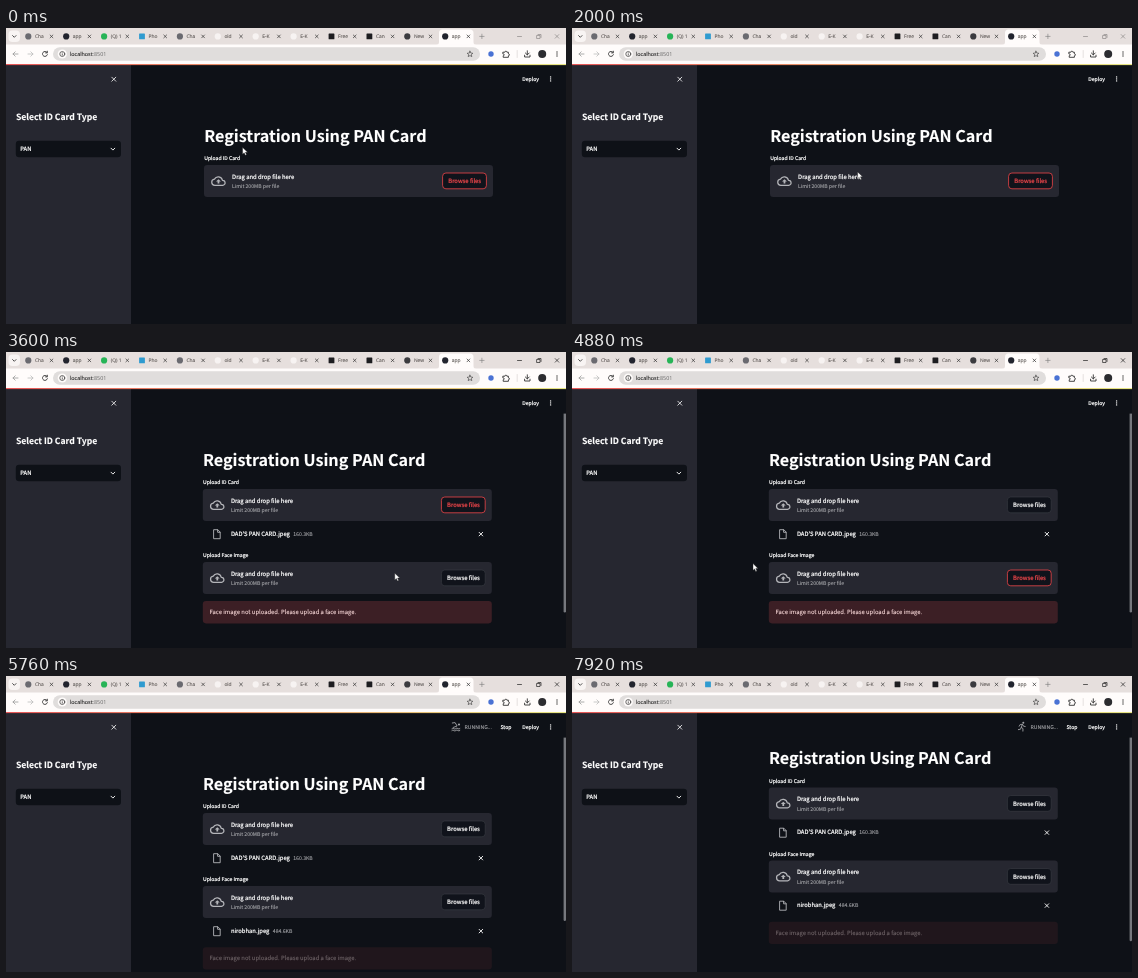
Animation, 560 px wide and 296 px high, one loop 8 s. Source, as an HTML page:

```html
<!DOCTYPE html>
<html lang="en">
<head>
<meta charset="utf-8">
<title>Registration form</title>
<style>
  html, body { margin: 0; width: 100%; height: 100%; overflow: hidden; background: #0e1117; }
  svg { display: block; width: 560px; height: 296px; }
  text {
    font-family: "Noto Sans CJK SC", "Noto Sans CJK JP", "Noto Sans CJK", Lato, sans-serif;
    font-size: 5.87px; text-rendering: geometricPrecision; white-space: pre;
    color: #fff; fill: currentColor; stroke: currentColor; stroke-width: .22;
  }
  .small { font-size: 5.14px; }
  .muted { color: #a3a4a8; stroke-width: .12; }
  .title { font-size: 16.15px; font-weight: 700; }
  .heading { font-size: 8.6px; font-weight: 700; }
  .title, .heading { stroke-width: .15; }
  .chrome { font: 5.4px "Open Sans", sans-serif; color: #222; stroke-width: .1; }
  .tab { font-size: 4.9px; color: #5c5755; }
  .alert { color: #ffdede; stroke-width: .1; }
  .line { fill: none; stroke-linecap: round; stroke-linejoin: round; }
  .button rect { fill: #10131b; stroke: #3c3e46; stroke-width: .6; }
  .button.active rect { stroke: #ee464a; stroke-width: .8; }
  .button.active text { color: #ee464a; }
</style>
</head>
<body>
<svg id="stage" viewBox="0 0 560 296" xmlns="http://www.w3.org/2000/svg"></svg>
<script>
const LOOP = 8000;
const ROW = 73;           // height of one uploader with its file row
const stage = document.getElementById('stage');

const text = (x, y, s, cls = '', extra = '') => `<text x="${x}" y="${y}" class="${cls}" ${extra}>${s}</text>`;
const rect = (x, y, w, h, fill, r = 0) => `<rect x="${x}" y="${y}" width="${w}" height="${h}" rx="${r}" fill="${fill}"/>`;
const dot = (x, y, r, fill) => `<circle cx="${x}" cy="${y}" r="${r}" fill="${fill}"/>`;
const line = (d, color, width = .8) => `<path class="line" d="${d}" stroke="${color}" stroke-width="${width}"/>`;
const cross = (x, y, r, color, width) =>
  line(`M${x - r} ${y - r}l${2 * r} ${2 * r}m0 ${-2 * r}l${-2 * r} ${2 * r}`, color, width);
const menuDots = (x, y, color, gap) => [-gap, 0, gap].map(d => dot(x, y + d, .7, color)).join('');

function tabStrip() {
  const pale = '#f7f3f2';
  const tabs = [
    ['Cha', '#6a6a70'], ['app', '#22242e'], ['(Q) 1', '#27b457'], ['Pho', '#2f9bd0', 1],
    ['Cha', '#6a6a70'], ['old', pale], ['E-K', pale], ['E-K', pale],
    ['Free', '#1d1d20', 1], ['Can', '#1d1d20', 1], ['New', '#3b3b3f'], ['app', '#22242e'],
  ];
  const items = tabs.map(([label, color, square], i) => {
    const x = 22.3 + i * 37.9;
    const icon = square ? rect(x - 2.9, 5.5, 5.8, 5.8, color, .6) : dot(x, 8.4, 3.1, color);
    return icon + text(x + 6.6, 10.2, label, 'chrome tab') + cross(x + 23.2, 8.4, 1.4, '#333', .7);
  });
  return rect(0, 0, 560, 17, '#e6dfdd') + rect(2.5, 2.5, 11.5, 11.5, '#f8f4f3', 4) +
    line('M6.6 7.6l1.7 1.7l1.7-1.7', '#222') +
    `<path d="M430 17q3 0 3-3V5q0-3.500 3.500-3.500h27.500q3.500 0 3.500 3.500v9q0 3 3 3z" fill="#fffcfb"/>` +
    items.join('') +
    line('M473.700 8.400h4.400m-2.200-2.200v4.400', '#777', .6) +
    '<g id="windowControls">' +
    line('M511.500 8.500h4M531 7.500h3v3h-3zM532 6.500h3v3', '#222', .7) + cross(551, 8.4, 1.8, '#222', .7) + '</g>';
}

function toolbar() {
  const dark = '#333';
  return rect(0, 16.5, 560, 20, '#fffcfb') +
    line('M12 26h-5m2.200-2.200l-2.200 2.200l2.200 2.200', '#999') +
    line('M22 26h5m-2.200-2.200l2.200 2.200l-2.200 2.200', '#bbb') +
    line('M40.900 24.300a2.500 2.500 0 1 0 .5 2.400M41.300 23.200v1.700h-1.700', dark, .9) +
    rect(47, 19.2, 427, 13.6, '#e0dddc', 6.8) + dot(56.3, 26, 4.6, '#fffcfb') +
    `<circle cx="56.300" cy="26" r="2.500" class="line" stroke="${dark}" stroke-width=".7"/>` +
    line('M56.300 26v1.200M56.300 24.800v.1', dark, .7) +
    text(64, 28, 'localhost<tspan fill="#666" stroke="none">:8501</tspan>', 'chrome') +
    line('M464 23.200l.85 1.850l2 .2l-1.500 1.350l.45 2l-1.800-1.050l-1.800 1.050l.45-2l-1.500-1.350l2-.2z', dark, .6) +
    dot(485, 26, 2.7, '#4a72d4') +
    line('M497.200 24.200h1.700a1 1 0 0 1 2 0h1.500v1.600a1 1 0 0 1 0 2v1.500h-5.200v-1.500a1 1 0 0 0 0-2z', dark, .9) +
    line('M511.200 22.500v7', '#cbc4c2', .5) +
    line('M521.300 22.800v4m-1.900-1.800l1.900 1.900l1.900-1.900M518.600 27.200v1.800h5.400v-1.800', dark, .9) +
    dot(536.2, 26, 4, '#2c2c30') + menuDots(551, 26, dark, 2) +
    rect(0, 36.2, 560, .9, 'url(#decoration)');
}

function sidebar() {
  return rect(0, 37, 125, 259, '#262730') + cross(107.8, 51.2, 2, '#fff', .8) +
    text(9.9, 91.9, 'Select ID Card Type', 'heading') +
    rect(9.8, 112.8, 105.2, 16.4, '#0e1117', 3.2) + text(14.2, 123.3, 'PAN') +
    line('M105 120.200l1.900 1.900l1.900-1.900', '#fff', .9);
}

function uploader(label, id) {
  return text(198.2, 132, label, 'small') + rect(198, 137, 289, 32, '#262730', 3.3) +
    `<g transform="translate(205.100 145.600) scale(.615)">
      ${line('M19 19H6a5 5 0 0 1-.5-9.970A7 7 0 0 1 18.500 11A4 4 0 0 1 19 19z', '#b4b5b9', 2)}
      <path d="M8 13h2.550v3h2.900v-3H16l-4-4z" fill="#b4b5b9"/></g>` +
    text(226.1, 150.6, 'Drag and drop file here') + text(226.1, 160.4, 'Limit 200MB per file', 'small muted') +
    `<g class="button" id="${id}"><rect x="436.600" y="145" width="43.800" height="15.800" rx="3.300"/>` +
    text(458.7, 155, 'Browse files', '', 'text-anchor="middle"') + '</g>';
}

const fileRow = (name, sizeX, size) =>
  line('M209.200 177.700h3.800l2.400 2.400v6.600h-6.200zM212.800 177.900v2.400h2.400', '#b4b5b9', .9) +
  text(226.1, 183.9, name) + text(sizeX, 183.6, size, 'small muted') + cross(476.1, 182.1, 1.8, '#fff', .9);

const errorBox = () => rect(198, 249, 289, 22.4, '#3c1f25', 3.3) +
  text(204.7, 262.3, 'Face image not uploaded. Please upload a face image.', 'alert');

function header() {
  const grey = '#a3a4a8';
  const swimmer = dot(453, 48.5, 1.1, grey) +
    line('M446.300 47l2.800-.4l2 3.400l-3.700 1.400M445.900 52.600q1-1 2 0t2 0t2 0t2 0M445.900 54.500q1-1 2 0t2 0t2 0t2 0', grey, .9);
  const runner = dot(451.3, 46.8, 1, grey) +
    line('M447.200 50.200l1-1.700l2.300-.2l1 1.900l1.700.3M450.300 48.500l-1 2.800l1.700 1.300l-.1 2.500M449.300 51.300l-.8 1.900l-2.100.4', grey, .9);
  return rect(125, 37, 435, 24.6, '#0e1117') +
    text(516.2, 52.9, 'Deploy', 'small') + menuDots(544.6, 50.9, '#fff', 2) +
    `<g id="running"><g id="swimmer">${swimmer}</g><g id="runner">${runner}</g>` +
    text(458.6, 52.9, 'RUNNING...', 'small muted') + text(494.4, 52.9, 'Stop', 'small') + '</g>';
}

stage.innerHTML =
  `<linearGradient id="decoration" gradientUnits="userSpaceOnUse" x1="0" x2="560">
    <stop stop-color="#ff4b4b"/><stop offset="1" stop-color="#fffd80"/></linearGradient>` +
  rect(0, 0, 560, 296, '#0e1117') +
  `<g id="content">
    ${text(198.2, 113.9, 'Registration Using PAN Card', 'title')}
    ${uploader('Upload ID Card', 'cardButton')}
    <g id="cardFile">${fileRow("DAD'S PAN CARD.jpeg", 288.4, '160.3KB')}</g>
    <g id="face" transform="translate(0 ${ROW})">${uploader('Upload Face Image', 'faceButton')}
      <g id="faceFile">${fileRow('nirobhan.jpeg', 268, '484.6KB')}</g></g>
    <g id="error">${errorBox()}</g>
  </g>
  <rect id="thumb" x="557.600" width="2.400" rx="1.200" fill="#76787d"/>` +
  header() + sidebar() + tabStrip() + toolbar() +
  `<path id="cursor" d="M0 0v6.800l1.600-1.400l1.100 2.500l1.200-.5l-1.100-2.500h2.200z" fill="#fff" stroke="#222" stroke-width=".4"/>`;

const part = Object.fromEntries([...stage.querySelectorAll('[id]')].map(el => [el.id, el]));
const show = (name, on) => part[name].setAttribute('visibility', on ? 'inherit' : 'hidden');
const move = (name, x, y) => part[name].setAttribute('transform', `translate(${x} ${y})`);
const fade = (name, opacity) => part[name].setAttribute('opacity', opacity);
const ramp = (t, from, to) => {
  const p = Math.min(1, Math.max(0, (t - from) / (to - from)));
  return p * p * (3 - 2 * p);
};

// time, x, y
const cursorPath = [
  [0, 236.6, 119.4], [160, 236.6, 119.4], [1040, 318.9, 135.3], [1500, 318.9, 135.3], [2400, 262, 150],
  [2660, 255, 152], [2920, 185.5, 210], [3240, 185.5, 210], [3780, 459, 225],
  [4080, 459, 225], [4700, 181, 211.5], [LOOP, 181, 211.5],
];
function cursorAt(t) {
  const i = cursorPath.findIndex(k => k[0] > t);
  const [t0, x0, y0] = cursorPath[i - 1], [t1, x1, y1] = cursorPath[i];
  const p = ramp(t, t0, t1);
  return [x0 + (x1 - x0) * p, y0 + (y1 - y0) * p];
}

function draw(t) {
  const hasCard = t >= 3200, hasFace = t >= 3360, hasPhoto = t >= 5200, running = t >= 5360;
  const scroll = 25.5 * ramp(t, 5840, 6160);

  fade('windowControls', t < 3120 ? .45 : 1);
  move('content', hasFace ? -1.2 : 0, -scroll);
  show('cardFile', hasCard);
  show('face', hasFace);
  show('faceFile', hasPhoto);
  show('error', hasFace);
  move('error', 0, hasPhoto ? 22.2 : 0);
  fade('error', 1 - .6 * ramp(t, 5360, 5600));

  part.cardButton.classList.toggle('active', t < 3700);
  part.faceButton.classList.toggle('active', t >= 3700 && !hasPhoto);

  show('thumb', hasFace);
  part.thumb.setAttribute('y', 37.4 + scroll * .8);
  part.thumb.setAttribute('height', hasPhoto ? 207.5 : 223);

  show('running', running);
  show('swimmer', running && t < 7040);
  show('runner', running && t >= 7040);

  show('cursor', t < 5120);
  move('cursor', ...cursorAt(t));
}

const start = performance.now();
function tick() {
  draw((performance.now() - start) % LOOP);
  requestAnimationFrame(tick);
}
draw(0);
requestAnimationFrame(tick);
</script>
</body>
</html>
```
